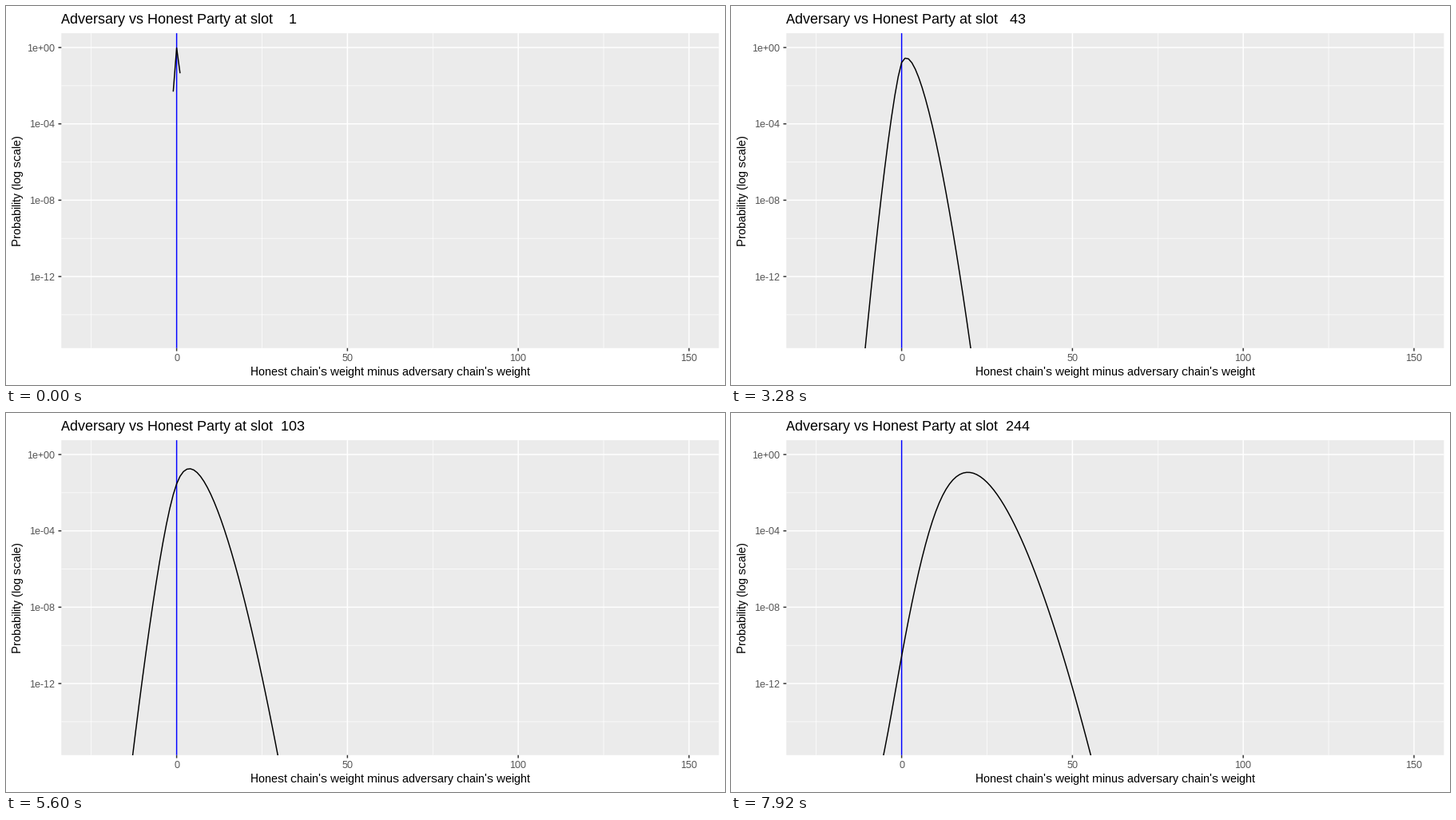
A matplotlib script that plays this animation: 900 by 475 pixels, repeating every 8000 ms.

```python
from math import comb

import numpy as np
import matplotlib.pyplot as plt
from matplotlib.animation import FuncAnimation
from matplotlib.patches import Rectangle

W, H, DPI = 900, 475, 100
FRAMES, INTERVAL = 100, 80
LEFT, RIGHT, TOP, BOTTOM = 69.3, 892.36, 34.1, 428.75
THICK, THIN = 1.07, 0.53
TICK = 3.8

# Whole-pixel glyph advances without kerning
plt.rcParams.update({
    "font.family": "Liberation Sans",
    "text.hinting": "default",
    "text.hinting_factor": 1,
    "text.kerning_factor": 6,
})


def px(weight):
    return LEFT + (weight + 33.75) / 192.5 * (RIGHT - LEFT)


def py(exponent):
    return TOP + (0.75 - exponent) / 16.5 * (BOTTOM - TOP)


# Random walk of the chain weight difference
ACTIVE, ADVERSARY = 0.05, 0.1
P_HONEST = 1 - (1 - ACTIVE) ** (1 - ADVERSARY)
P_ADVERSARY = 1 - (1 - ACTIVE) ** ADVERSARY
UP = P_HONEST * (1 - P_ADVERSARY)
DOWN = P_ADVERSARY * (1 - P_HONEST)

# A committee vote boosts the honest chain unless it misses the quorum
BOOST_SLOT, BOOST = 150, 10
COMMITTEE, QUORUM = 200, 150
NO_QUORUM = sum(comb(COMMITTEE, votes) * (1 - ADVERSARY) ** votes
                * ADVERSARY ** (COMMITTEE - votes) for votes in range(QUORUM))

slots = sorted({int(1.03 ** k) for k in range(200)})[:FRAMES]
REACH = slots[-1] + BOOST + 5
weights = np.arange(-REACH, REACH + 1)


def walk(last_slot):
    """Distribution of the weight difference after each slot."""
    step = [DOWN, 1 - UP - DOWN, UP]
    prob = (weights == 0).astype(float)
    history = {}
    for slot in range(1, last_slot + 1):
        prob = np.convolve(prob, step, mode="same")
        if slot == BOOST_SLOT:
            prob = (1 - NO_QUORUM) * np.roll(prob, BOOST) + NO_QUORUM * prob
        history[slot] = prob
    return history


history = walk(slots[-1])

fig = plt.figure(figsize=(W / DPI, H / DPI), dpi=DPI, facecolor="white")
ax = fig.add_axes([0, 0, 1, 1])
ax.set_xlim(0, W)
ax.set_ylim(H, 0)
ax.axis("off")

panel = Rectangle((LEFT, TOP), RIGHT - LEFT, BOTTOM - TOP,
                  fc="#ebebeb", ec="none", snap=False, zorder=0)
ax.add_patch(panel)


def line(xs, ys, color, width, zorder):
    return ax.plot(xs, ys, color=color, lw=width, zorder=zorder, snap=False,
                   solid_capstyle="butt", solid_joinstyle="round")[0]


def label(x, y, text, size, color="black", **kwargs):
    return ax.text(x, y, text, size=size, color=color,
                   va="baseline", **kwargs)


def grid(xs, ys, width, zorder):
    for x in xs:
        line([px(x)] * 2, [TOP, BOTTOM], "white", width, zorder)
    for y in ys:
        line([LEFT, RIGHT], [py(y)] * 2, "white", width, zorder)


x_breaks, y_breaks = range(0, 151, 50), range(0, -13, -4)
grid(range(-25, 126, 50), range(-2, -15, -4), THIN, 1)
grid(x_breaks, y_breaks, THICK, 2)

for x in x_breaks:
    line([px(x)] * 2, [BOTTOM, BOTTOM + TICK], "#333333", THICK, 3)
    label(px(x), 445, str(x), 8.8, "#4d4d4d", ha="center")
for y in y_breaks:
    line([LEFT - TICK, LEFT], [py(y)] * 2, "#333333", THICK, 3)
    label(62.4, py(y) + 4.5, f"1e{y:+03d}", 8.8, "#4d4d4d", ha="right")

label((LEFT + RIGHT) / 2, 463,
      "Honest chain's weight minus adversary chain's weight", 11, ha="center")
label(19.5, (TOP + BOTTOM) / 2, "Probability (log scale)", 11,
      rotation=90, rotation_mode="anchor", ha="center")
title = label(LEFT, 22, "", 13.2, ha="left")

line([px(0)] * 2, [TOP, BOTTOM], "#0000ff", THICK, 4)
curve = line([], [], "black", THICK, 5)
curve.set_clip_path(panel)


def update(frame):
    slot = slots[frame]
    prob = history[slot]
    seen = prob > 1e-40
    curve.set_data(px(weights[seen]), py(np.log10(prob[seen])))
    title.set_text(f"Adversary vs Honest Party at slot {slot:4d}")
    return curve, title


anim = FuncAnimation(fig, update, frames=FRAMES, interval=INTERVAL,
                     repeat=True, repeat_delay=0, blit=False)
plt.show()
```
